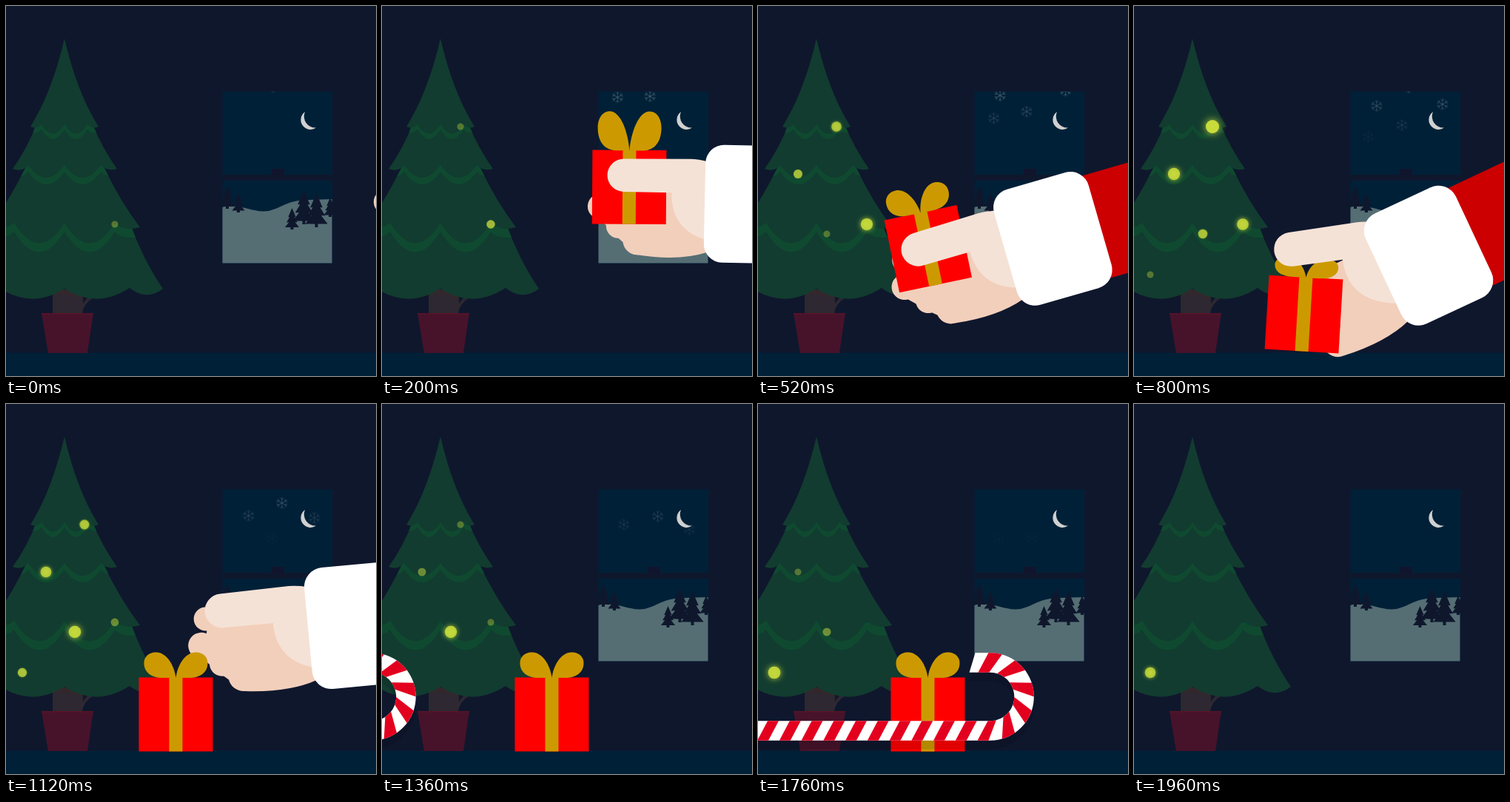
Animation, 500 px wide and 500 px high, one loop 2 s. Source, as an HTML page with a canvas:

```html
<!DOCTYPE html>
<html lang="en">
<head>
<meta charset="utf-8">
<title>Christmas gift</title>
<style>
html, body { margin: 0; width: 100%; height: 100%; overflow: hidden; background: #0f172d; }
canvas { display: block; }
</style>
</head>
<body>
<canvas id="stage" width="500" height="500"></canvas>
<script>
const ctx = document.getElementById('stage').getContext('2d');
const LOOP = 2000, STEP = 40, { PI, sin, cos, min, max, abs } = Math;
const NIGHT = '#0f172d', SKY = '#002037', GREEN = '#123c30', BAND = '#0f4a30';
const GOLD = '#cc9a00', SKIN = '#f2cfbb', LAMP = '#c8dc3c';

function fill(color, path) {
  ctx.fillStyle = color;
  ctx.fill(new Path2D(path));
}
function rect(color, x, y, w, h) {
  ctx.fillStyle = color;
  ctx.fillRect(x, y, w, h);
}
function disc(color, x, y, r) {
  ctx.fillStyle = color;
  ctx.beginPath();
  ctx.arc(x, y, r, 0, PI * 2);
  ctx.fill();
}
function at(x, y, deg, draw, scale = 1) {
  ctx.save();
  ctx.translate(x, y);
  ctx.rotate(deg * PI / 180);
  ctx.scale(scale, scale);
  draw();
  ctx.restore();
}

const progress = (t, from, to) => min(1, max(0, (t - from) / (to - from)));
const smooth = (t, from, to) => {
  const u = progress(t, from, to);
  return u * u * (3 - 2 * u);
};

// Each flake: x, start time, speed
const flakes = [[317, 40, .089], [361, 0, .065], [326, 280, .05], [415, 440, .066], [371, 790, .075]];

function drawFlake(t, x, start, speed) {
  const fallen = (t - start) * speed;
  if (fallen < 0 || fallen > 80) return;
  ctx.strokeStyle = `rgba(125,145,160,${.45 * (1 - fallen / 80)})`;
  ctx.lineWidth = 1;
  for (let i = 0; i < 6; i++) at(x + 2 * sin(fallen / 20), 109 + fallen, i * 60, () => {
    ctx.stroke(new Path2D('M0,0V-8M-2.5,-7L0,-4.5L2.5,-7'));
  });
}

function drawPine(x, top, h) {
  let d = '';
  for (let i = 0; i < 3; i++) {
    const y = top + h * i * .24, w = h * (.18 + i * .075);
    d += `M${x},${y}L${x + w},${y + h * .42}H${x - w}Z`;
  }
  fill(NIGHT, d);
  rect(NIGHT, x - 2, top + h * .85, 4, h * .15);
}

function drawWindow(t) {
  ctx.save();
  ctx.beginPath();
  ctx.rect(292.5, 115.5, 148.5, 232.5);
  ctx.clip();
  rect(SKY, 292, 115, 150, 234);
  fill('#d0d0d0', 'M404,143A13,13 0 0 0 419,164.5A15.5,15.5 0 0 1 404,143Z');
  for (const f of flakes) drawFlake(t, ...f);
  fill('#556e74', 'M292,272C312,266 330,277.5 348,277.5C368,277.5 378,261 410,262L440.5,261V347.5H292Z');
  for (const [x, top, h] of [[299, 243, 31], [314, 253, 26], [386.5, 273, 29], [402.5, 249, 46], [419.5, 253, 46], [438, 259, 26]]) {
    drawPine(x, top, h);
  }
  rect(NIGHT, 292, 228, 150, 8);
  rect('#10152d', 359, 220, 17, 9);
  ctx.restore();
}

// Each lamp: x, y, switch-on time, time to full brightness
const lamps = [[106, 163, 200, 600], [54, 227, 290, 620], [147, 295, 0, 640], [93, 308, 490, 740], [22, 363, 760, 880]];

function drawLamp(t, x, y, start, rise) {
  if (t < start || t > 1600 + start * .7) return;
  const k = max(.08, 1 - abs(t - start - rise) / rise);
  ctx.save();
  ctx.globalAlpha = .32 + .68 * k;
  ctx.shadowColor = LAMP;
  ctx.shadowBlur = max(0, k - .3) * 15;
  disc(LAMP, x, y, 4.2 + 4.8 * k);
  ctx.restore();
}

// Tree tiers from top to bottom, with the depth of the band below each
const tiers = [
  ['M79,44Q62,117 33,163Q42,167 48,159.5Q63,186 79,159.5Q95,186 110,159.5Q116,167 125,163Q96,117 79,44Z', 7],
  ['M41,160Q29,192 9,220Q22,225 30,215Q54,249 79,215Q104,249 128,215Q137,224 150,220Q130,192 117,160Z', 9],
  ['M28,215Q5,262 -22,299Q-2,304 11,293Q45,348 79,293Q113,348 147,293Q160,305 181,299Q153,262 131,215Z', 12],
  ['M-10,290L-54,382Q-30,398 -9,381Q35,410 79,382Q123,410 167,381Q190,399 212,382Q187,346 168,295Z', 0]
];

function drawTree(t) {
  fill('#2d2831', 'M63,383H104V402L111,393L118,394Q105,402 103,415H63Z');
  fill('#33272b', 'M63,391Q79,376 103,392V398Q85,386 63,391Z');
  fill('#47132b', 'M48,415H118L110,469H57Z');
  rect('#591427', 48, 415, 70, 1.5);
  for (let i = 3; i >= 0; i--) {
    const [path, drop] = tiers[i];
    if (drop) {
      ctx.save();
      ctx.clip(new Path2D(tiers[i + 1][0]));
      at(0, drop, 0, () => fill(BAND, path));
      ctx.restore();
    }
    fill(GREEN, path);
  }
  for (const lamp of lamps) drawLamp(t, ...lamp);
}

function drawGift(x, y, tilt, bow) {
  at(x, y, tilt, () => {
    rect('#ff0000', -50, -50, 100, 100);
    rect(GOLD, -9, -50, 18, 100);
    ctx.translate(0, -49.5);
    for (const side of [1, -1]) {
      ctx.save();
      ctx.scale(side, bow);
      fill(GOLD, 'M0,0C2,-16 12,-34.5 27,-34.5C37,-34.5 43,-28 43,-20C43,-8 34,0 18,0Z');
      ctx.restore();
    }
  });
}

function drawPalm() {
  disc(SKIN, -197, -27, 15.5);
  disc(SKIN, -206, 7, 17);
  disc(SKIN, -181, 33, 16.5);
  disc(SKIN, -155, 52, 19.5);
  fill(SKIN, 'M-197,-42H-40V66H-60Q-98,79 -155,71.5L-181,49L-206,24L-197,-11Z');
}

function drawThumb(open) {
  at(-12, -8, open, () => {
    ctx.translate(12, 8);
    fill('#f5e2d6', 'M-175,-58L-85,-59.5Q-75,-59.5 -60,-56L-20,-50V52H-50Q-110,42 -110,-13.5H-175A22.2,22.2 0 0 1 -175,-58Z');
  });
}

function drawSleeve() {
  rect('#cc0000', 55, -69, 420, 140);
  ctx.fillStyle = '#ffffff';
  ctx.beginPath();
  ctx.roundRect(-65, -79.5, 130, 159, 25);
  ctx.fill();
}

// Point on the cane: s runs from the hook's tip, n is the offset outward
function canePoint(s, n) {
  const lead = 24, r = 46, bend = PI * r;
  if (s < lead) return [s - lead, -r - n];
  if (s > lead + bend) return [lead + bend - s, r + n];
  const a = (s - lead) / r;
  return [sin(a) * (r + n), -cos(a) * (r + n)];
}

function caneBand(color, from, to, skew) {
  const parts = Math.ceil((to - from) / 4);
  ctx.fillStyle = color;
  ctx.beginPath();
  for (const side of [1, -1]) {
    for (let i = 0; i <= parts; i++) {
      const u = (side > 0 ? i : parts - i) / parts;
      ctx.lineTo(...canePoint(from + (to - from) * u + side * skew, side * 13.3));
    }
  }
  ctx.fill();
}

function drawCane(right) {
  const period = 29.75;
  at(right - 59.5, 407.5, 0, () => caneBand('rgba(0,0,0,.12)', 0, 640, 4));
  at(right - 59.5, 395.5, 0, () => {
    caneBand('#ffffff', 0, 640, 4);
    for (let s = period / 2; s < 620; s += period) caneBand('#e3001f', s, s + period / 2, 7);
  });
}

function caneReach(t) {
  if (t < 1680) return -10 + 419 * (1 - cos(PI * (t - 1260) / 420)) / 2;
  return 409 - 440 * ((t - 1680) / 280) ** 2;
}

function draw(t) {
  rect(NIGHT, 0, 0, 500, 500);
  rect(SKY, 0, 468.5, 500, 32);
  drawWindow(t);
  drawTree(t);

  // The arm reaches in, swings down, lets go and withdraws
  const entry = (1 - progress(t, 0, 560)) ** 2.58;
  const exit = progress(t, 760, 1300) ** 3.7;
  const swing = smooth(t, 340, 640), lift = smooth(t, 760, 1345);
  const hand = draw => at(
    398 + 322 * entry + 347 * exit,
    271 - 9 * entry + 67 * swing - 58 * lift,
    1.2 - 26.7 * swing + 30 * lift,
    draw, 1 + .035 * swing);

  // The gift sways and its bow bounces until both settle
  const phase = progress(t, 340, 1120), sway = 1 - phase;
  const tilt = 1.2 * entry - 15.5 * sway * sin(phase * 2 * PI);
  const bow = 1 + .64 * sway * cos(phase * 2 * PI) * smooth(t, -200, 340);
  const drop = smooth(t, 330, 710), reach = caneReach(t);
  const x = 229.5 + 327 * entry;
  const y = 247 - 7 * entry + 172.5 * drop - 50 * drop * sin(abs(tilt) * PI / 180);

  hand(drawPalm);
  drawGift(t > 1680 ? min(x, reach - 76) : x, y, tilt, bow);
  hand(() => {
    drawThumb(17.5 * (smooth(t, 600, 800) - smooth(t, 820, 1100)));
    drawSleeve();
  });
  if (t >= 1260) drawCane(reach);
}

const start = performance.now();
function tick() {
  const t = (performance.now() - start) % LOOP;
  draw(Math.floor(t / STEP) * STEP);
  requestAnimationFrame(tick);
}
tick();
</script>
</body>
</html>
```
